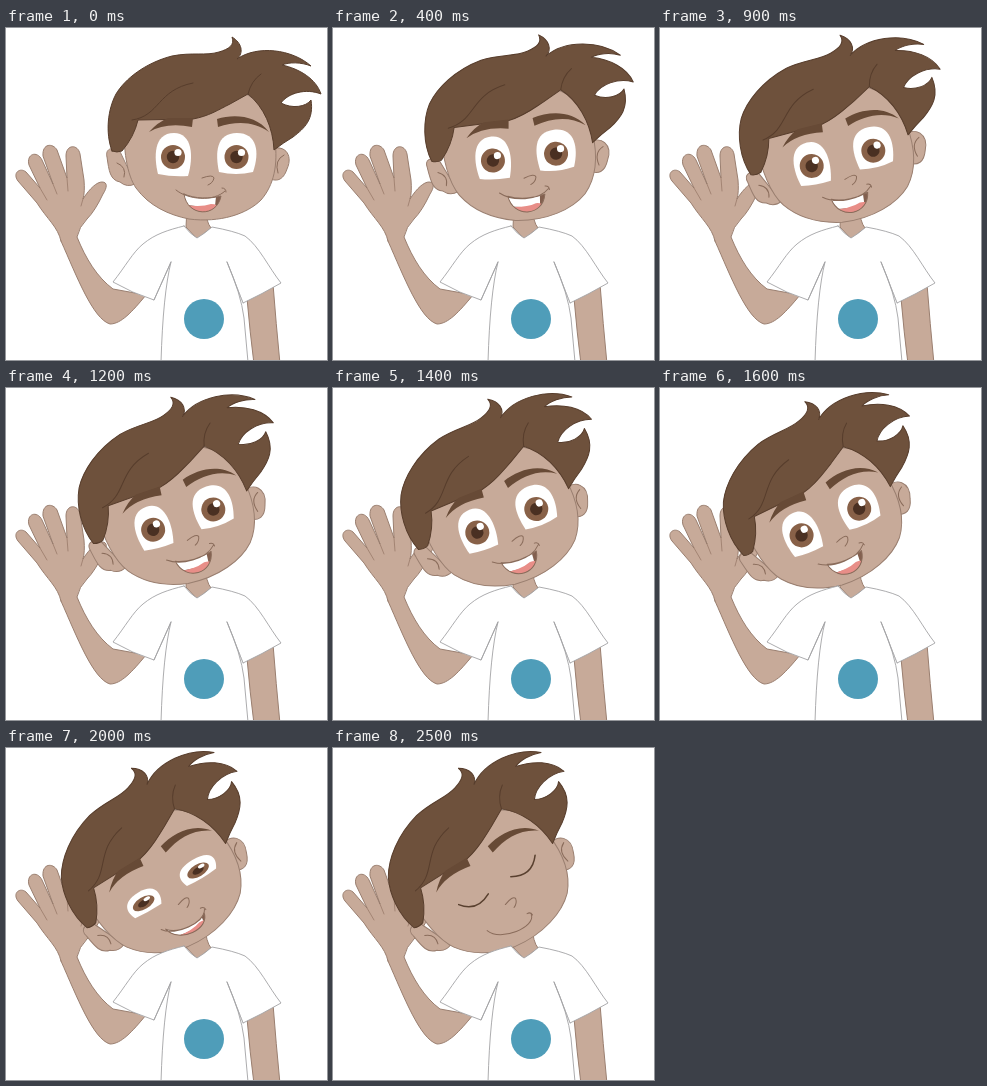
An HTML page for the animation above (2700 ms loop, 321 px wide and 332 px high).

```html
<!DOCTYPE html>
<html lang="en">
<head>
<meta charset="utf-8">
<title>Waving boy</title>
<style>
html, body { margin: 0; width: 100%; height: 100%; overflow: hidden; background: #fff; }
svg { display: block; width: 100vw; height: 100vh; }
path { stroke-linejoin: round; stroke-linecap: round; }
.skin { fill: #c7aa99; stroke: #9a7f70; }
.line { fill: none; stroke: #8a6c5b; }
.hair { fill: #6e513c; stroke: #573d2c; }
.lock { fill: none; stroke: #573d2c; }
.brow { fill: #674a36; }
.shirt { fill: #fff; stroke: #a3a3a5; stroke-width: .9; }
.white { fill: #fff; }
.lid { fill: none; stroke: #59402f; stroke-width: 1.5; }
</style>
</head>
<body>
<svg viewBox="0 0 321 332">
  <defs>
    <clipPath id="mouthClip"><path id="mouthShape"/></clipPath>
  </defs>

  <!-- arms -->
  <path class="skin" d="M55 213 C52 199 41 191 31 175 L12 153 C6 145 14 139 20 144 L34 160
    L23 137 C20 126 31 122 36 132 L47 156 L37 128 C36 115 47 115 51 122 L61 150 L60 128
    C60 116 72 116 74 126 L78 152 Q79 164 77 171 C84 160 91 154 96 154 C102 154 101 160 97 166
    Q89 183 81 191 Q73 199 71 209 C80 231 91 249 107 261 L140 267 C126 284 115 296 104 296
    C87 291 71 249 55 213Z"/>
  <path class="line" opacity=".6" d="M34 160 L41 172 M47 156 L51 166 M61 150 L62 163 M77 171 L75 178"/>
  <path class="skin" d="M241 270 Q244 305 248 336 H274 Q270 295 267 256Z"/>

  <!-- neck -->
  <path class="skin" d="M181 180 L180 199 L191 211 L205 200 Q200 194 199 178Z"/>

  <g id="head">
    <path class="skin" d="M114 124 C105 117 99 122 101 129 C103 143 104 152 114 154 Q121 160 129 156Z"/>
    <path class="skin" d="M264 122 C277 115 288 126 281 141 C277 153 270 154 262 150Z"/>
    <path class="line" d="M111 135 Q121 139 118 149 M278 127 Q268 132 272 145"/>
    <path class="skin" stroke="none" d="M118 90 C117 122 121 147 130 160 C143 178 163 187 183 191 C214 195 241 186 255 172 C268 157 272 137 269 112 C264 75 240 55 190 58Z"/>
    <path class="hair" d="M106 123 C99 104 102 81 110 66 C119 51 139 35 166 28 C186 24 200 28 213 24
      C223 21 229 17 226 9 C236 15 238 25 231 31 C251 17 286 21 305 38 C295 34 283 34 276 37
      C294 41 310 51 315 66 C300 60 282 65 275 75 C286 81 300 79 305 72 C308 91 299 100 287 109
      Q277 115 268 122 C267 100 258 79 242 66 Q233 71 224 76 C212 82 203 88 187 91
      L132 92 Q128 109 116 123 Q111 125 106 123Z"/>
    <path class="lock" d="M126 92 C154 88 151 62 187 55 M242 66 Q245 53 255 46"/>
    <path class="brow" d="M143 104 Q152 94 162 90 L187 90 L186 99 Q160 94 143 104Z"/>
    <path class="brow" d="M211 91 C228 86 250 87 263 104 C248 93 230 93 212 99Z"/>

    <g id="eyes">
      <path class="white" d="M152 146 C148 130 147 105 168 105 C186 105 188 128 182 148 Q166 149 152 146Z"/>
      <path class="white" d="M213 144 C209 125 210 105 231 105 C251 105 254 124 247 144 Q230 148 213 144Z"/>
      <g id="irises"></g>
    </g>
    <path id="lids" class="lid" d="M156 126 Q168 142 187 132 M215 129 Q234 140 247 123"/>

    <path class="line" d="M196 150 Q207 146 208 150 Q207 155 202 157"/>
    <g clip-path="url(#mouthClip)">
      <rect x="160" y="150" width="70" height="50" fill="#83604f"/>
      <path class="white" d="M160 150 H212 L209 178 Q194 181 170 174Z"/>
      <path fill="#e88e88" d="M174 176 Q194 180 205 176 Q212 176 214 181 L210 192 H180Z"/>
    </g>
    <path id="mouthLine" class="line"/>
  </g>

  <!-- shirt -->
  <path class="shirt" d="M178 198 Q184 206 191 210 Q198 206 206 199 Q228 203 239 208 C253 218 263 240 275 255
    Q256 266 237 275 L221 234 L165 234 L148 272 Q126 265 107 254 C119 239 127 224 137 216 C149 206 162 202 178 198Z"/>
  <path class="white" d="M165 233 H221 L237 274 L242 334 H155 Q155 301 159 272Z"/>
  <path class="shirt" d="M221 234 Q235 266 238 290 L242 334 H155 Q157 266 165 234" style="fill: none"/>
  <path class="shirt" d="M165 234 L148 272 M221 234 L237 275"/>
  <circle cx="198" cy="291" r="20" fill="#4f9db9"/>
</svg>
<script>
const LOOP = 2700, STEP = 100;
const $ = id => document.getElementById(id);
const clamp = x => Math.max(0, Math.min(1, x));
const ramp = (t, from, to) => clamp((t - from) / (to - from));

const iris = x => `<circle cx="${x}" cy="129" r="12" fill="#886148"/>
  <circle cx="${x}" cy="129" r="6.2" fill="#4a3022"/>
  <circle cx="${x + 5}" cy="124.5" r="3.6" fill="#fff"/>`;
$("irises").innerHTML = iris(167) + iris(230.5);

// Point lists run from the left corner to the right corner.
const TOP = [[178, 166], [189, 171], [204, 171], [215, 168]];
const BOTTOM = [[178, 166], [181, 189], [211, 190], [215, 168]];
const SMILE = [[170, 162], [182, 172], [208, 174], [219, 163]];
const CLOSED = [[167, 163], [173, 180], [211, 185], [213, 172]];
const blend = (a, b, k) => a.map((p, i) => p.map((v, j) => v + (b[i][j] - v) * k));
const curve = p => `C${p[1]} ${p[2]} ${p[3]}`;

function drawMouth(shut) {
  const [top, low, smile] = [TOP, BOTTOM, SMILE].map(p => blend(p, CLOSED, shut));
  const shape = `M${top[0]} ${curve(top)} ${curve([...low].reverse())}Z`;
  $("mouthShape").setAttribute("d", shape);
  $("mouthLine").setAttribute("d", `${shape} M${smile[0]} ${curve(smile)} m-3 -3 q4 0 4 4`);
}

function draw(t) {
  const shut = ramp(t, 1800, 2200);
  $("head").setAttribute("transform", `rotate(${-31 * ramp(t, 0, 2000)} 196 196)`);
  $("eyes").setAttribute("transform", `translate(0 ${133 * shut}) scale(1 ${1 - shut})`);
  $("eyes").style.display = shut < 1 ? "" : "none";
  $("lids").style.display = shut < 1 ? "none" : "";
  drawMouth(shut);
}

function tick() {
  const t = performance.now() % LOOP;
  draw(Math.floor(t / STEP) * STEP);
  requestAnimationFrame(tick);
}
tick();
</script>
</body>
</html>
```
